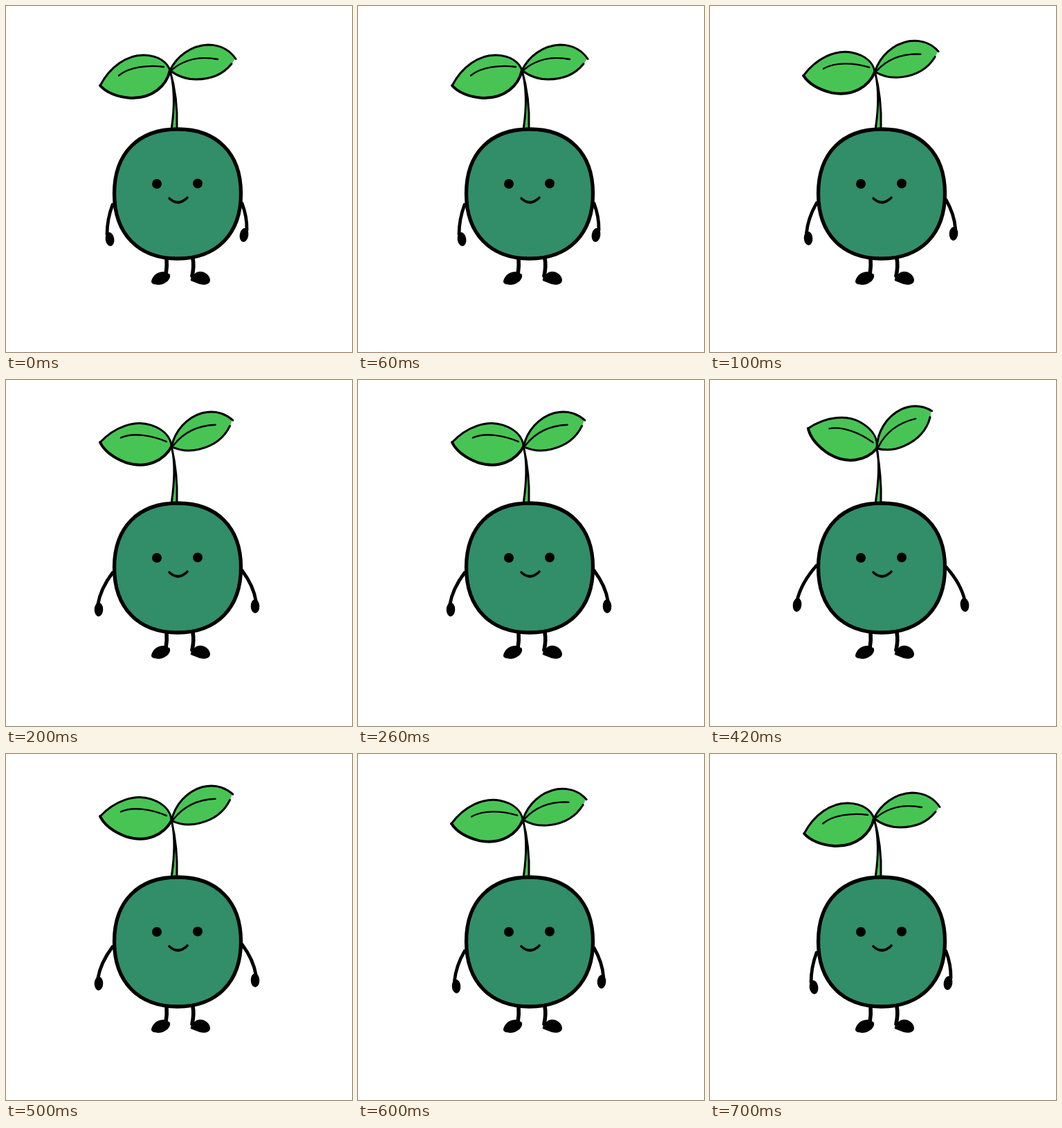
Recreate the animation shown at these times as an HTML page. Size 500x500 px, loop 0.8 s.

```html
<!DOCTYPE html>
<html lang="en">
<head>
<meta charset="utf-8">
<title>Sprout</title>
<style>
  html, body { margin: 0; width: 100%; height: 100%; overflow: hidden; background: #fff; }
  svg { display: block; width: 100vw; height: 100vh; }
  .line { fill: none; stroke: #000; stroke-width: 3; stroke-linecap: round; stroke-linejoin: round; }
  .vein { stroke-width: 2.4; }
  .limb { stroke-width: 4.8; }
  .leaf { fill: #48c455; }
</style>
</head>
<body>
<svg viewBox="0 0 500 500">
  <path class="leaf" d="M243 122Q248 150 247 176H239Q243 150 243 122Z"/>
  <path id="stem" class="line" stroke-linejoin="round"/>

  <!-- Leaves grow from the hinge at the origin -->
  <g id="leftLeaf">
    <path class="leaf" d="M-101 22C-87 -5 -62 -23 -37 -22C-15 -21 -4 -11 0 0C-5 22 -25 41 -57 40C-79 38 -92 32 -101 22Z"/>
    <path class="line" d="M-101 22C-87 -5 -62 -23 -37 -22C-15 -21 -4 -11 0 0"/>
    <path class="line" style="stroke-width:4" d="M0 0C-5 22 -25 41 -57 40C-79 38 -92 32 -101 22"/>
    <path class="line vein" d="M-74 7.500C-59 -5 -32 -8 -9 -5"/>
  </g>
  <g id="rightLeaf">
    <path class="leaf" d="M0 0C10 -21 31 -36 55 -37C74 -37 85 -27 94 -17C87 -3 68 13 38 13C21 13 10 8 0 0Z"/>
    <path class="line" d="M0 0C10 -21 31 -36 55 -37C75 -37 88 -27 95 -16.500"/>
    <path class="line" d="M89 -9.500C79 3 62 13 38 13C21 13 10 8 0 0"/>
    <path class="line vein" d="M3 -1C20 -15 43 -21 69 -16"/>
  </g>

  <path id="leftArm" class="line limb"/>
  <ellipse id="leftHand" rx="6.300" ry="10"/>
  <path id="rightArm" class="line limb"/>
  <ellipse id="rightHand" rx="6.300" ry="10"/>

  <!-- Legs and feet -->
  <path class="line" style="stroke-width:5.600" d="M232 365Q233 376 231 388M270 365Q272 376 269 390"/>
  <path d="M228 384C218 383 210 392 210 399C212 404 225 404 230 400C236 397 239 390 236 387Z"/>
  <path d="M275 385C285 381 294 388 295 396C295 402 288 404 280 402L267 397C266 393 270 389 275 385Z"/>

  <!-- Body and face -->
  <path fill="#318e69" stroke="#000" stroke-width="5.300"
    d="M248 178C305 178 339.500 213 339.500 271S305 365 248 365S156.500 329 156.500 271S191 178 248 178Z"/>
  <circle cx="218" cy="257" r="7"/>
  <circle cx="277" cy="256.500" r="7"/>
  <path class="line" style="stroke-width:3.600" d="M236 278Q249 290 262 277"/>
</svg>
<script>
const STEP = 100, LAST = 3;
const SWAY = [0, 0.32, 0.55, 1]; // how far the leaves rise at each step

const set = (id, name, value) => document.getElementById(id).setAttribute(name, value);
const mix = (a, b, t) => a + (b - a) * t;

// out is -1 for the left arm, 1 for the right; spread and lift run from 0 to 1.
function drawArm(side, out, shoulder, hand, spread, lift) {
  const x = mix(hand.x, hand.x + out * 24, spread);
  const y = mix(hand.y, hand.top, lift);
  const sx = shoulder.x, sy = mix(shoulder.y, shoulder.top, lift);
  const wx = x + out * 4 * (1 - spread), wy = y - 7;
  const bend = out * mix(4, 8, spread);
  set(side + "Arm", "d", `M${sx} ${sy}Q${(sx + wx) / 2 + bend} ${(sy + wy) / 2} ${wx} ${wy}`);
  set(side + "Hand", "transform", `translate(${x} ${y}) rotate(${out * mix(9, -7, spread)})`);
}

function drawLeaves(sway) {
  const x = mix(237, 241, sway), y = mix(93, 99, sway);
  set("stem", "d", `M${x} ${y}C244 117 248 146 247 175M${x + 1} ${y + 4}Q246 130 239.500 175`);
  set("leftLeaf", "transform", `translate(${x} ${y}) rotate(${28.6 * sway})`);
  set("rightLeaf", "transform", `translate(${x} ${y}) rotate(${-24.4 * sway})`);
}

function frame() {
  // The sway plays forward, then back, in held steps.
  const count = Math.floor(performance.now() / STEP) % (2 * LAST + 2);
  const step = Math.min(count, 2 * LAST + 1 - count);
  const raise = step / LAST;
  drawLeaves(SWAY[step]);
  drawArm("left", -1, { x: 154, y: 287, top: 268 }, { x: 150, y: 337, top: 325 }, raise, raise ** 2);
  drawArm("right", 1, { x: 341, y: 285, top: 270 }, { x: 344, y: 331, top: 325 }, raise, raise);
  requestAnimationFrame(frame);
}
frame();
</script>
</body>
</html>
```
